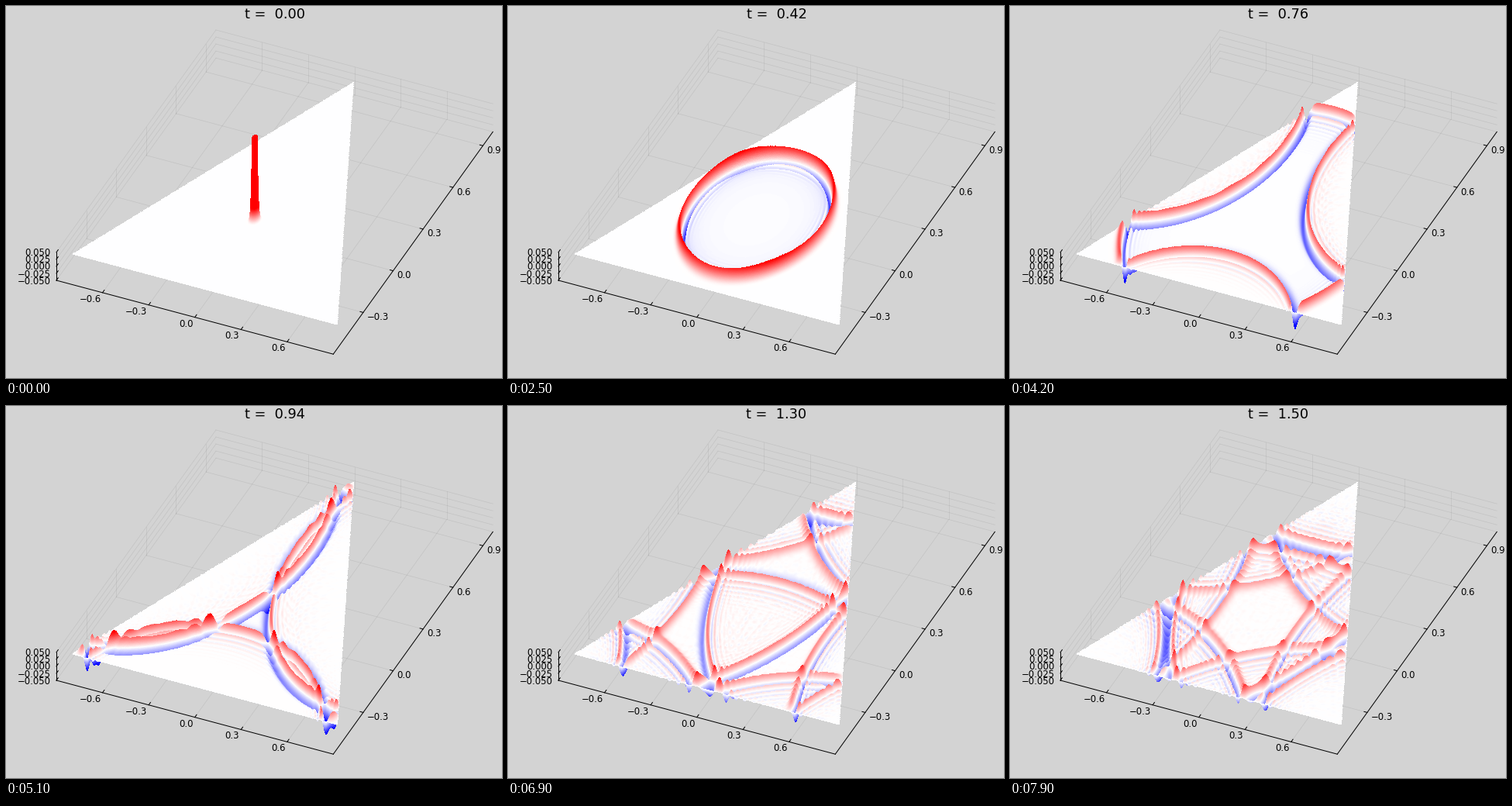
A matplotlib script for the animation above (8 s loop, 640 by 480 pixels).

```python
import numpy as np
import matplotlib.pyplot as plt
from matplotlib.animation import FuncAnimation
from matplotlib.colors import LinearSegmentedColormap

W, H, DPI = 640, 480, 100
FRAMES, HOLD, STEP_MS = 80, 4, 100
X0, X1, Y0, Y1, Z0, Z1 = -0.9, 0.9, -0.6, 1.0, -0.05, 0.05
DX, DT, SUB = 0.005, 0.0025, 8      # grid step, time step, steps per frame
SIGMA, Z_CAP = 0.01, 0.295
VIEW = np.array([[198.5, 128.7], [52.9, -179.3]])   # pixels per unit of x, y
CORNER, Z_PX = (65, 354), 362


def project(x, y, z):
    """Orthographic view: data coordinates to stage pixels."""
    a, b = x - X0, y - Y0
    return (CORNER[0] + VIEW[0, 0] * a + VIEW[0, 1] * b,
            CORNER[1] + VIEW[1, 0] * a + VIEW[1, 1] * b - Z_PX * (z - Z0))


# Wave equation on an equilateral triangle with a clamped edge.
gx, gy = np.meshgrid(np.linspace(X0, X1, round((X1 - X0) / DX) + 1),
                     np.linspace(Y0, Y1, round((Y1 - Y0) / DX) + 1))
inside = (gy >= -0.5 - 1e-9) & (np.abs(gx) * np.sqrt(3) <= 1 - gy + 1e-9)
cells = inside[:-1, :-1] & inside[1:, :-1] & inside[:-1, 1:] & inside[1:, 1:]


def accel(u):
    a = np.zeros_like(u)
    a[1:-1, 1:-1] = (u[2:, 1:-1] + u[:-2, 1:-1] + u[1:-1, 2:] + u[1:-1, :-2]
                     - 4 * u[1:-1, 1:-1])
    return a * inside * (DT / DX) ** 2


def simulate(count):
    u = np.exp(-(gx ** 2 + gy ** 2) / (2 * SIGMA ** 2)) * inside
    prev = u + accel(u) / 2
    shots = [u]
    for _ in range(count - 1):
        for _ in range(SUB):
            u, prev = 2 * u - prev + accel(u), u
        shots.append(u)
    return shots


shots = simulate(FRAMES - HOLD)

# Floor points under every pixel column, listed from far to near.
cols, rows = np.meshgrid(np.arange(80, 455), np.arange(90, 415, 0.5))
inv = np.linalg.inv(VIEW)
dx, dy = cols + 0.5 - CORNER[0], rows - CORNER[1] - Z_PX * Z0
i = (inv[0, 0] * dx + inv[0, 1] * dy) / DX
j = (inv[1, 0] * dx + inv[1, 1] * dy) / DX
ni, nj = gx.shape[1] - 2, gx.shape[0] - 2
ci, cj = np.floor(i).astype(int), np.floor(j).astype(int)
on = (ci >= 0) & (ci <= ni) & (cj >= 0) & (cj <= nj)
ci, cj = ci.clip(0, ni), cj.clip(0, nj)
on &= cells[cj, ci]
fi, fj = (i - ci).clip(0, 1), (j - cj).clip(0, 1)
seen = on[:-1]
floor_row, floor_col = rows[:-1][seen], cols[:-1][seen]


def render(u):
    """Height seen at each pixel; nearer points overwrite farther ones."""
    z = ((u[cj, ci] * (1 - fi) + u[cj, ci + 1] * fi) * (1 - fj)
         + (u[cj + 1, ci] * (1 - fi) + u[cj + 1, ci + 1] * fi) * fj) * on
    z = np.minimum(z, Z_CAP)
    near, step = z[:-1][seen], np.diff(z, axis=0)[seen]
    n = int(np.abs(0.5 - Z_PX * step).max()) + 2
    s = np.arange(n) / n
    height = near[:, None] + step[:, None] * s
    row = floor_row[:, None] + 0.5 * s - Z_PX * height
    row = row.astype(int).clip(0, H - 1)
    img = np.full((H, W), np.nan)
    img[row.ravel(), np.repeat(floor_col, n)] = height.ravel() - 1e-5
    return np.ma.masked_invalid(img)


fig = plt.figure(figsize=(W / DPI, H / DPI), dpi=DPI, facecolor="lightgray")
ax = fig.add_axes([0, 0, 1, 1])
ax.axis("off")
bwr = LinearSegmentedColormap.from_list("wave", ["blue", "white", "red"], N=256)
surface = ax.imshow(render(shots[0]), cmap=bwr, vmin=Z0, vmax=Z1, zorder=2,
                    extent=(0, W, H, 0), aspect="auto", interpolation="nearest")
ax.set_autoscale_on(False)


def line(p, q, **style):
    (ax0, ay0), (bx0, by0) = project(*p), project(*q)
    ax.plot([ax0, bx0], [ay0, by0], **style)


def label(x, y, s, ha, px=11.6):
    return ax.text(x, y, s, ha=ha, va="baseline", fontsize=px * 72 / DPI,
                   family="DejaVu Sans")


def num(v, digits):
    return f"{v:.{digits}f}".replace("-", "\u2212")


GRID = dict(color="black", alpha=0.08, lw=0.5, zorder=1)
AXIS = dict(color="black", lw=0.72, zorder=4)
xticks = (-0.6, -0.3, 0.0, 0.3, 0.6)
yticks = (-0.3, 0.0, 0.3, 0.6, 0.9)
zticks = (-0.05, -0.025, 0.0, 0.025, 0.05)

for v in xticks:
    line((v, Y0, Z0), (v, Y1, Z0), **GRID)
    line((v, Y1, Z0), (v, Y1, Z1), **GRID)
    line((v, Y0, Z0), (v, Y0 + 0.018, Z0), **AXIS)
    tx, ty = project(v, Y0, Z0)
    label(tx - 2, ty + 12, num(v, 1), "right")
for v in yticks:
    line((X0, v, Z0), (X1, v, Z0), **GRID)
    line((X0, v, Z0), (X0, v, Z1), **GRID)
    line((X1, v, Z0), (X1 - 0.02, v, Z0), **AXIS)
    tx, ty = project(X1, v, Z0)
    label(tx + 5, ty + 9.5, num(v, 1), "left")
for v in zticks:
    line((X0, Y0, v), (X0, Y1, v), **GRID)
    line((X0, Y1, v), (X1, Y1, v), **GRID)
    line((X0, Y0, v), (X0, Y0 + 0.018, v), **AXIS)
    tx, ty = project(X0, Y0, v)
    label(tx - 7.5, ty + 4.6, num(v, 3), "right")
line((X0, Y0, Z0), (X1, Y0, Z0), **AXIS)
line((X1, Y0, Z0), (X1, Y1, Z0), **AXIS)
line((X0, Y0, Z0), (X0, Y0, Z1), **AXIS)

title = label(346.5, 15.5, "", "center", 17.7)


def update(frame):
    n = max(0, frame - HOLD)
    surface.set_data(render(shots[n]))
    title.set_text(f"t = {n * 0.02:5.2f}")
    return surface, title


anim = FuncAnimation(fig, update, frames=FRAMES, interval=STEP_MS,
                     repeat=True, repeat_delay=0, blit=False)
plt.show()
```
